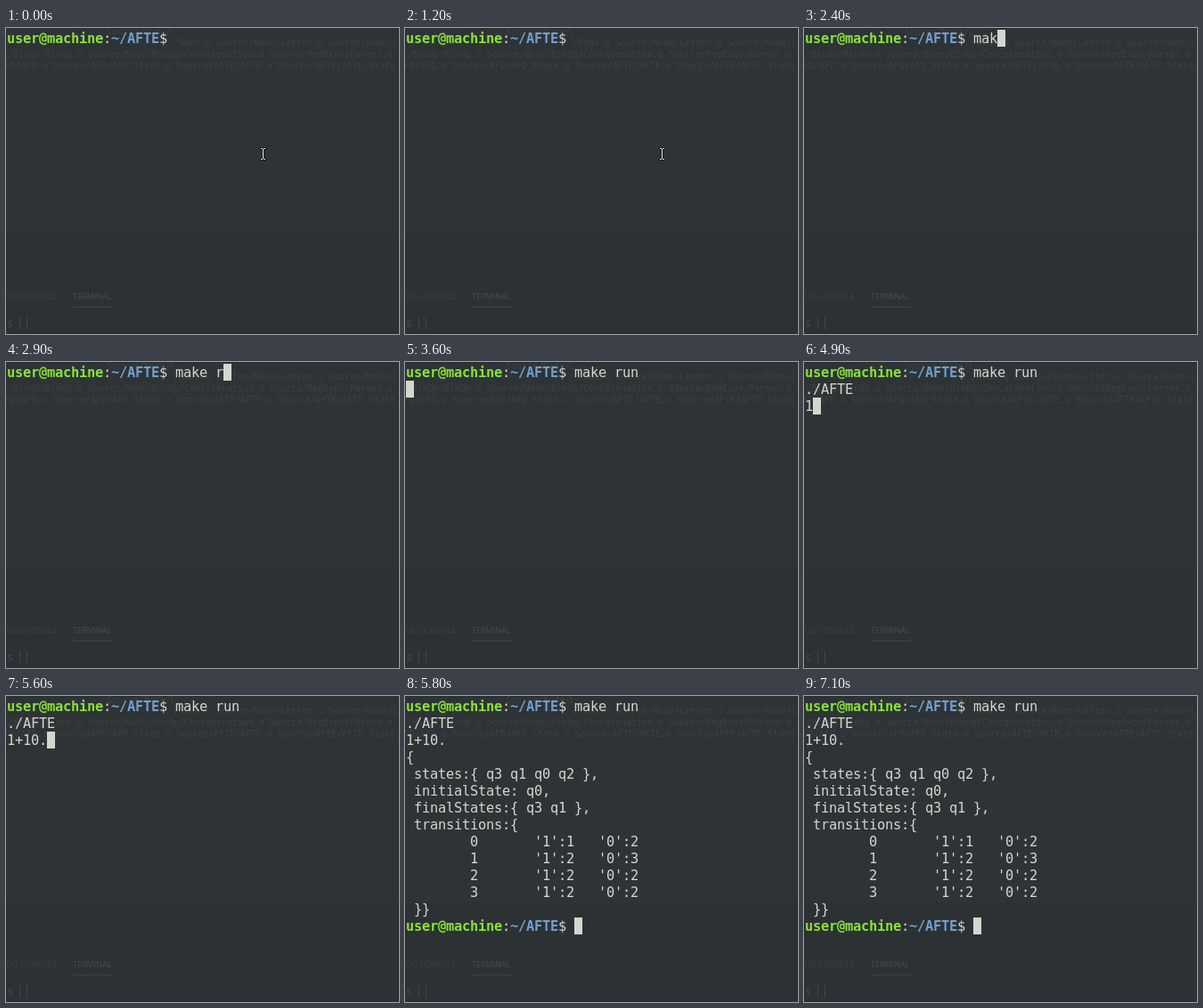
These frames come from a looping animation (441x344 px, 7.9 s). An HTML page with a canvas:

```html
<!DOCTYPE html>
<html lang="en">
<head>
<meta charset="utf-8">
<title>Terminal session</title>
<style>
  html, body { margin: 0; width: 100%; height: 100%; overflow: hidden; background: #2e3436; }
  canvas { display: block; }
</style>
</head>
<body>
<canvas id="stage" width="441" height="344"></canvas>
<script>
const ctx = document.getElementById('stage').getContext('2d');
const LOOP = 7900, CELL_W = 9, CELL_H = 19, LEFT = 1, TOP = 2, ASCENT = 15;
const TEXT = '#d3d7cf', GREEN = '#8ae234', BLUE = '#729fcf';
const MONO = '"DejaVu Sans Mono", monospace';
const USER = 'user@machine', PATH = '~/AFTE', PROMPT = `${USER}:${PATH}$ `;

const row = (state, one, zero) => `        ${state}       '1':${one}   '0':${zero}\n`;
const RESULT = `
{
 states:{ q3 q1 q0 q2 },
 initialState: q0,
 finalStates:{ q3 q1 },
 transitions:{
${row(0, 1, 2)}${row(1, 2, 3)}${row(2, 2, 2)}${row(3, 2, 2)} }}
${PROMPT}`;

// [time, appended output]
const OUTPUT = [
  [0, PROMPT],
  [1600, 'm'], [1800, 'a'], [2400, 'k'], [2600, 'e'], [2800, ' '],
  [2900, 'r'], [3100, 'u'], [3200, 'n'], [3600, '\n'], [3700, './AFTE\n'],
  [4900, '1'], [5100, '+'], [5200, '1'], [5300, '0'], [5600, '.'],
  [5800, RESULT],
];
const CURSOR_OFF = [[0, 600], [1200, 1600], [4200, 4900], [6400, 7100]];
const POINTER_GONE = 1600;

function rect(color, x, y, w, h) {
  ctx.fillStyle = color;
  ctx.fillRect(x, y, w, h);
}

function cells(text, x, y, step) {
  [...text].forEach((char, i) => ctx.fillText(char, x + i * step, y));
}

// The window behind the translucent terminal.
function drawBackdrop() {
  rect('#2e3436', 0, 0, 441, 344);
  rect('#2c3234', 0, 232, 441, 112);
  rect('#282d2f', 0, 0, 441, 1);
  rect('#292e30', 0, 343, 441, 1);
  rect('#2f3537', 403, 234, 1, 54);

  ctx.fillStyle = '#3b4143';
  ctx.font = `10px ${MONO}`;
  cells('Source/Node/L', 113, 8, 6);
  cells('/Node.o Source/Node/Letter.o Source/Node/Lambda.o', 188, 20, 6);
  cells('/BinOp/BinOp.o Source/Node/BinOp/Concatenation.o Source/RegExpr/Parser.o', 2, 33, 6);
  cells('FD/AFD.o Source/AFD/AFD_State.o Source/AFTE/AFTE.o Source/AFTE/AFTE_State.o', -1, 46, 6);

  ctx.font = '9px "Open Sans", sans-serif';
  ctx.textAlign = 'right';
  ctx.fillText('DEBUG CONSOLE', 57, 305);
  ctx.textAlign = 'left';
  ctx.fillStyle = '#474d4f';
  ctx.fillText('TERMINAL', 75, 305);
  rect('#3f4547', 75, 313, 45, 1);

  ctx.fillStyle = '#434a4c';
  ctx.font = `12px ${MONO}`;
  ctx.fillText('s', 1, 336);
  rect('#42484a', 15, 325, 1, 14);
  rect('#42484a', 23, 325, 1, 14);
}

function drawPointer() {
  rect('#1b1f20', 285, 134, 7, 3);
  rect('#1b1f20', 287, 135, 3, 13);
  rect('#1b1f20', 285, 146, 7, 3);
  rect('#e8eae8', 286, 135, 2, 1);
  rect('#e8eae8', 289, 135, 2, 1);
  rect('#e8eae8', 288, 136, 1, 11);
  rect('#e8eae8', 286, 147, 2, 1);
  rect('#e8eae8', 289, 147, 2, 1);
}

function drawRun(text, col, line, color = TEXT, weight = 'normal') {
  ctx.font = `${weight} 15.33px ${MONO}`;
  ctx.fillStyle = color;
  cells(text, LEFT + col * CELL_W, TOP + line * CELL_H + ASCENT, CELL_W);
}

function drawLine(text, line) {
  if (!text.startsWith(PROMPT)) return drawRun(text, 0, line);
  const pathCol = USER.length + 1, endCol = pathCol + PATH.length;
  drawRun(USER, 0, line, GREEN, 'bold');
  drawRun(':', USER.length, line);
  drawRun(PATH, pathCol, line, BLUE, 'bold');
  drawRun(text.slice(endCol), endCol, line);
}

function draw(time) {
  const lines = OUTPUT.filter(([at]) => at <= time).map(([, text]) => text).join('').split('\n');
  drawBackdrop();
  lines.forEach(drawLine);
  if (!CURSOR_OFF.some(([from, to]) => time >= from && time < to)) {
    const last = lines.length - 1;
    rect(TEXT, LEFT + lines[last].length * CELL_W, TOP + last * CELL_H, CELL_W, CELL_H);
  }
  if (time < POINTER_GONE) drawPointer();
}

const start = performance.now();
function tick() {
  draw((performance.now() - start) % LOOP);
  requestAnimationFrame(tick);
}
tick();
</script>
</body>
</html>
```
